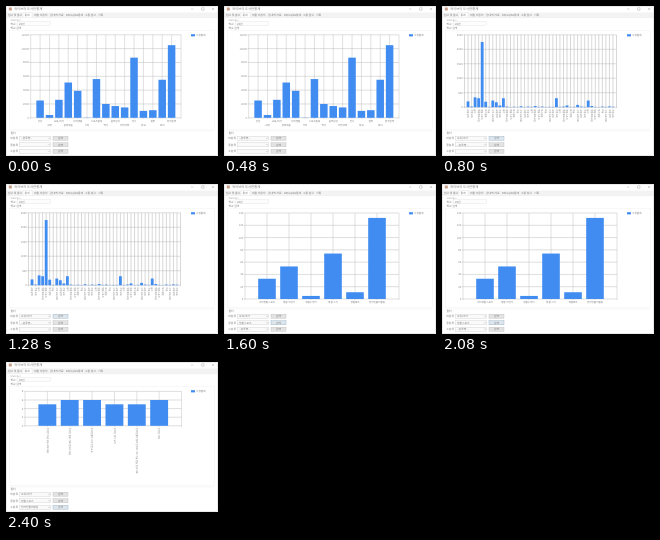
Animation, 212 px wide and 150 px high, one loop 3200 ms. Source, as an HTML page:

```html
<!DOCTYPE html>
<html>
<head>
<meta charset="utf-8">
<title>Library statistics</title>
<style>
html, body { margin: 0; width: 100%; height: 100%; overflow: hidden; background: #fff; }
svg { display: block; width: 100vw; height: 100vh; }
text {
  font-family: "Noto Sans CJK KR", "Noto Sans CJK", "Noto Sans", sans-serif;
  text-rendering: geometricPrecision;
}
.view { visibility: hidden; animation: show 3200ms step-end infinite; }
@keyframes show {
  0% { visibility: visible; }
  25%, 100% { visibility: hidden; }
}
</style>
</head>
<body>
<svg id="stage" viewBox="0 0 212 150"></svg>
<script>
const NS = 'http://www.w3.org/2000/svg';
const stage = document.getElementById('stage');
const BLUE = '#418cf0';

function add(parent, tag, attrs, content) {
  const el = document.createElementNS(NS, tag);
  for (const key in attrs) el.setAttribute(key, attrs[key]);
  if (content !== undefined) el.textContent = content;
  parent.appendChild(el);
  return el;
}
const rect = (p, x, y, width, height, fill, more) =>
  add(p, 'rect', { x, y, width, height, fill, ...more });
const line = (p, x1, y1, x2, y2, stroke = '#bcbcbc', w = 0.5) =>
  add(p, 'line', { x1, y1, x2, y2, stroke, 'stroke-width': w });
const label = (p, x, y, content, size = 2.8, fill = '#777', more) =>
  add(p, 'text', { x, y, 'font-size': size, fill, ...more }, content);
const frame = (p, x, y, w, h, stroke, fill = 'none') =>
  rect(p, x, y, w, h, fill, { stroke, 'stroke-width': 0.4 });

function drawWindow() {
  rect(stage, 0, 0, 212, 150, '#fff');
  rect(stage, 0, 6.5, 212, 5, '#f3f3f3');
  rect(stage, 2.8, 1.5, 3, 3, '#c9a08c');
  label(stage, 8.2, 4.2, '와이브의 도서관통계', 3.3);
  line(stage, 185, 3, 187.4, 3, '#999', 0.4);
  frame(stage, 195.8, 1.9, 2.2, 2.2, '#999');
  line(stage, 206, 1.9, 208.2, 4.1, '#999', 0.4);
  line(stage, 206, 4.1, 208.2, 1.9, '#999', 0.4);

  frame(stage, 17, 6.5, 9, 5.2, '#e2e2e2', '#fff');
  const tabs = [[2, '입고 및 출고'], [18.5, '통계'], [28, '대출 이용자'],
    [44, '관내의 자료'], [60, 'DB/sqlite통계'], [79, '소통 참고'], [92, '기록']];
  tabs.forEach(([x, name]) => label(stage, x, 10, name));
  line(stage, 0, 11.6, 17, 11.6, '#e2e2e2', 0.4);
  line(stage, 26, 11.6, 212, 11.6, '#e2e2e2', 0.4);

  label(stage, 4.5, 15, 'Statistics', 2.4, '#999');
  label(stage, 4.5, 18.5, '학교 :');
  frame(stage, 11.6, 15.7, 33, 3.7, '#dedede', '#fdfdfd');
  label(stage, 13, 18.5, '22년');
  label(stage, 4.5, 22.8, '학교 검색');
  frame(stage, 3.5, 24.3, 205, 99.2, '#eee');
  rect(stage, 185, 28.2, 4, 2.2, BLUE);
  label(stage, 190, 30.4, '소장율목', 2.6);

  line(stage, 3.5, 125, 208.5, 125, '#eaeaea', 0.4);
  label(stage, 4.5, 128.1, '필터');
  ['대분류', '중분류', '소분류'].forEach((name, i) =>
    label(stage, 4.3, 133.3 + i * 6.5, name));
  rect(stage, 0.3, 0.3, 211.4, 149.4, 'none', { stroke: '#d5d5d5', 'stroke-width': 0.5 });
}

function drawFilters(g, values, active) {
  values.forEach((value, i) => {
    const y = 130.2 + i * 6.5;
    frame(g, 13.7, y, 31, 4.1, '#cacaca', '#fafafa');
    label(g, 15, y + 3.1, value, 2.7);
    add(g, 'path', { d: `M42 ${y + 1.6}l.9 .9l.9 -.9`, fill: 'none', stroke: '#999', 'stroke-width': 0.4 });
    const on = i === active;
    frame(g, 47, y, 15, 4.1, on ? '#8fb0c8' : '#bcbcbc', on ? '#dfe6eb' : '#e3e3e3');
    label(g, 54.5, y + 3.1, '검색', 2.7, '#777', { 'text-anchor': 'middle' });
  });
}

function drawChart(g, c) {
  const { left, right, top, bottom, max, step, bars, slots } = c;
  const pitch = (right - left) / slots;
  const yOf = v => bottom - v / max * (bottom - top);
  for (let v = 0; v <= max; v += step) {
    line(g, left - 1.2, yOf(v), right, yOf(v));
    label(g, left - 1.8, yOf(v) + 1, v, 2.7, '#888', { 'text-anchor': 'end' });
  }
  for (let i = 0; i <= slots; i++) {
    const x = left + i * pitch;
    line(g, x, top, x, bottom + 1, c.grid || '#bcbcbc', 0.45);
  }
  const w = pitch * 0.8;
  bars.forEach((v, i) => {
    const x = left + (i + 1) * pitch;
    rect(g, x - w / 2, yOf(v), w, bottom - yOf(v), BLUE);
    const name = c.names[i % c.names.length];
    if (c.turned) {
      label(g, 0, 0, name, 2.3, '#777',
        { transform: `translate(${x - 0.8} ${bottom + 2}) rotate(90)` });
    } else {
      label(g, x, bottom + 3.9 + (c.stagger ? i % 2 * 4.4 : 0), name, 2.5, '#777',
        { 'text-anchor': 'middle' });
    }
  });
}

const PICK = '--분류명--';
const views = [
  {
    filters: [PICK, '', ''], active: -1,
    left: 24.7, right: 175, top: 28.8, bottom: 111.8, max: 12000, step: 2000, slots: 16,
    bars: [2500, 400, 2600, 5100, 3900, 30, 5600, 2000, 1700, 1500, 8700, 1000, 1100, 5500, 10500],
    names: ['건강', '교양', '교육/여가', '문화예술', '사회생활', '기타', '스포츠활동', '역사',
      '음악감상', '자연과학', '전시', '정보', '철학', '취미', '한국문학'],
    stagger: true
  },
  {
    filters: ['교육/여가', PICK, ''], active: 0,
    left: 22.5, right: 174.5, top: 28.8, bottom: 101.2, max: 2500, step: 500, slots: 43, grid: '#a9a9a9',
    bars: [200, 20, 340, 310, 2250, 190, 10, 230, 170, 60, 310, 20, 5, 15, 5, 30, 5, 20, 10, 40,
      10, 20, 5, 10, 10, 310, 10, 20, 60, 5, 10, 80, 20, 10, 230, 40, 10, 5, 20, 10, 25, 15],
    names: ['교양강좌', '가정교육', '놀이', '생활체육교실', '생활스포츠', '독서활동', '미술', '수학교육자료'],
    turned: true
  },
  {
    filters: ['교육/여가', '생활스포츠', PICK], active: 1,
    left: 21, right: 175, top: 29, bottom: 115, max: 140, step: 20, slots: 7,
    bars: [33, 53, 5, 74, 11, 132],
    names: ['기타생활스포츠', '생활 자전거', '생활수영기', '생활 스키', '생활체조', '인라인롤러활동']
  },
  {
    filters: ['교육/여가', '생활스포츠', '인라인롤러활동'], active: 2,
    left: 19, right: 175.5, top: 29.4, bottom: 63.8, max: 8, step: 2, slots: 7,
    bars: [5, 6, 6, 5, 5, 6],
    names: ['인라인 초급 강습 교재 모음', '인라인 활동 자료 안내서 모음', '인라인롤러 기초 안전 교육',
      '인라인 경기 규칙', '인라인롤러 장비 관리와 기초 기술 연습 안내 자료', '인라인 자료'],
    turned: true
  }
];

drawWindow();
views.forEach((view, i) => {
  const g = add(stage, 'g', { class: 'view' });
  // A negative delay gives each view its own quarter of the loop.
  g.style.animationDelay = `${(i - views.length) * 800}ms`;
  drawChart(g, view);
  drawFilters(g, view.filters, view.active);
});
</script>
</body>
</html>
```
